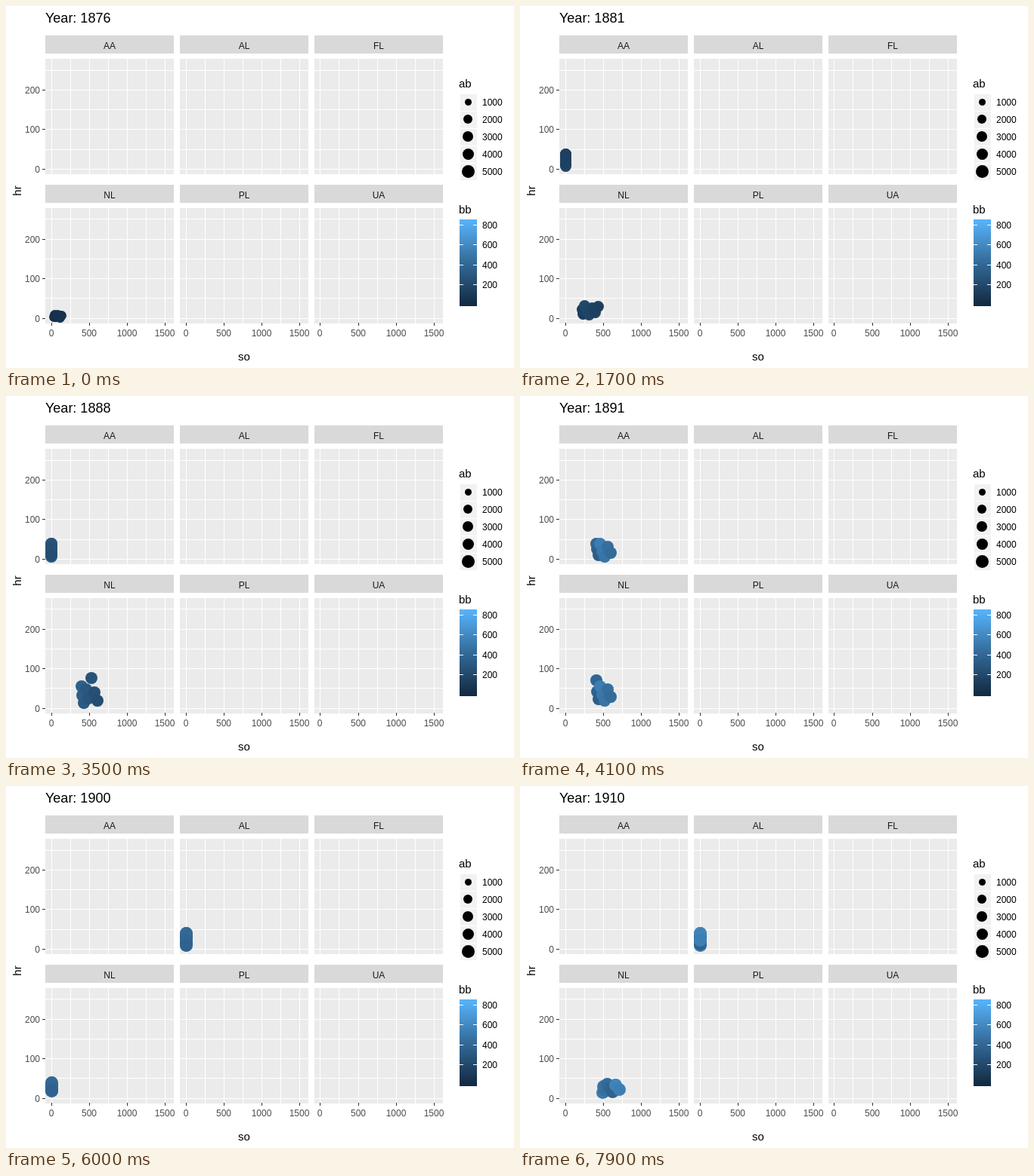
An HTML page with a canvas that plays this animation: 672 px wide and 480 px high, repeating every 8 s.

```html
<!DOCTYPE html>
<html lang="en">
<head>
<meta charset="utf-8">
<title>Seasons by league</title>
<style>
html, body { margin: 0; width: 100%; height: 100%; overflow: hidden; background: #fff; }
canvas { display: block; width: 672px; height: 480px; }
</style>
</head>
<body>
<canvas id="stage" width="672" height="480"></canvas>
<script>
const ctx = document.getElementById('stage').getContext('2d');
const LOOP = 8000, FIRST_YEAR = 1876;
const PANEL_W = 170, PANEL_H = 153;
const PANELS = ['AA', 'AL', 'FL', 'NL', 'PL', 'UA'].map((name, i) => ({
  name,
  x: 52 + 178 * (i % 3),
  y: i < 3 ? 70 : 268,
  zeroX: 59.7 + 177.825 * (i % 3),
  zeroY: i < 3 ? 215.9 : 413.6
}));
const RAMP = [[19, 43, 67], [51, 106, 152], [86, 177, 247]];
const MAX_BB = 835;

const soX = (panel, so) => panel.zeroX + so * 0.1004;
const hrY = (panel, hr) => panel.zeroY - hr * 0.525;

// Returns a function of the year, linear between [year, value] anchors.
const curve = (...anchors) => year => {
  let a = anchors[0];
  for (const b of anchors) {
    if (year <= b[0]) return b === a ? a[1] : a[1] + (b[1] - a[1]) * (year - a[0]) / (b[0] - a[0]);
    a = b;
  }
  return a[1];
};
const atBats = curve([1876, 2500], [1879, 2850], [1884, 3950], [1888, 4700], [1910, 5100]);
const walks = curve([1876, 42], [1879, 65], [1884, 210], [1888, 290], [1889, 440], [1895, 425],
  [1901, 335], [1910, 465]);
const soLow = curve([1876, 35], [1879, 172], [1882, 225], [1884, 458], [1888, 396], [1892, 405],
  [1895, 236], [1910, 489]);
const soSpan = curve([1876, 100], [1884, 240], [1895, 160], [1910, 217]);
const hrLow = curve([1876, 2], [1888, 14], [1895, 25], [1901, 18], [1908, 8], [1910, 15]);
const hrHigh = curve([1876, 8], [1884, 39], [1888, 56], [1895, 55], [1901, 38], [1908, 20], [1910, 33]);
const hrBest = curve([1876, 9], [1883, 34], [1884, 142], [1885, 54], [1888, 77], [1895, 61],
  [1901, 39], [1908, 22], [1910, 35]);

const LEAGUES = {
  NL: { from: 1876, to: 1910, counted: y => y < 1897 || y > 1909 },
  AA: { from: 1882, to: 1891, hr: [7, 38], counted: y => y > 1888 },
  UA: { from: 1884, to: 1884, hr: [5, 32] },
  PL: { from: 1890, to: 1890, hr: [20, 66], so: [321, 100], counted: () => true },
  AL: { from: 1901, to: 1910, hr: [9, 40] }
};

// Spreads the teams of a season over its ranges, in an order shuffled by the year.
function season(name, year) {
  const league = LEAGUES[name];
  if (!league || year < league.from || year > league.to) return [];
  const n = name === 'NL' && year > 1891 && year < 1900 ? 12 : 8;
  const [low, high] = league.hr || [hrLow(year), hrHigh(year)];
  const best = league.hr ? high : hrBest(year);
  const [least, span] = league.so || [soLow(year), soSpan(year)];
  const counted = league.counted && league.counted(year);
  return Array.from({ length: n }, (_, i) => {
    const power = (i * 5 + year * 3 + 6) % n;
    const patience = (i * 7 + year + 7) % n / (n - 1);
    return {
      so: counted ? least + span * (i / (n - 1)) ** 1.5 : 0,
      hr: power === n - 1 ? best : low + (high - low) * (power / (n - 2)) ** 1.2,
      bb: walks(year) * (0.78 + 0.44 * patience)
    };
  });
}

function diameter(ab) {
  const size = 1 + 5 * Math.sqrt((ab - 211) / 5570);
  return Math.floor(size * 2.845 + 1.24);
}
function shade(bb) {
  const t = Math.min(1, bb / MAX_BB) * 2;
  const k = t < 1 ? 0 : 1;
  return `rgb(${RAMP[k].map((c, i) => Math.round(c + (RAMP[k + 1][i] - c) * (t - k)))})`;
}

function rect(x, y, w, h, color) {
  ctx.fillStyle = color;
  ctx.fillRect(x, y, w, h);
}
// Dots sit on whole pixels.
function dot(x, y, ab, color) {
  const d = diameter(ab), r = d / 2;
  const snap = v => Math.ceil(v - r - 0.5) + r;
  ctx.fillStyle = color;
  ctx.beginPath();
  ctx.arc(snap(x), snap(y), r, 0, 2 * Math.PI);
  ctx.fill();
}
function text(s, x, y, size, color = '#000', align = 'left') {
  ctx.font = `${size}px "Liberation Sans", Arial, sans-serif`;
  ctx.fillStyle = color;
  ctx.textAlign = align;
  ctx.fillText(s, x, y);
}

function drawPanel(panel, index, year) {
  const { x, y, name } = panel;
  const column = so => Math.round(soX(panel, so));
  const row = hr => Math.round(hrY(panel, hr));
  rect(x, y - 31, PANEL_W, 24, '#d9d9d9');
  text(name, x + 85, y - 13, 12, '#1a1a1a', 'center');
  rect(x, y, PANEL_W, PANEL_H, '#ebebeb');
  for (let so = 0; so <= 1500; so += 250) rect(column(so), y, 1, PANEL_H, '#fff');
  for (let hr = 0; hr <= 250; hr += 50) rect(x, row(hr), PANEL_W, 1, '#fff');

  ctx.save();
  ctx.beginPath();
  ctx.rect(x, y, PANEL_W, PANEL_H);
  ctx.clip();
  for (const team of season(name, year)) {
    dot(soX(panel, team.so) + 0.5, hrY(panel, team.hr) + 0.5, atBats(year), shade(team.bb));
  }
  ctx.restore();

  if (index % 3 === 0) {
    for (let hr = 0; hr <= 200; hr += 100) {
      rect(x - 4, row(hr), 4, 1, '#333');
      text(hr, x - 7, row(hr) + 5, 12, '#4d4d4d', 'right');
    }
  }
  if (index > 2) {
    for (let so = 0; so <= 1500; so += 500) {
      rect(column(so), 420, 1, 4, '#333');
      text(so, column(so), 438, 12, '#4d4d4d', 'center');
    }
  }
}

function drawLegends() {
  text('ab', 599, 108, 15);
  for (let i = 0; i < 5; i++) {
    const ab = 1000 * (i + 1), y = 116 + 23 * i;
    rect(601, y + 1, 22, 22, '#f2f2f2');
    dot(611.5, y + 11.5, ab, '#000');
    text(ab, 630, y + 16, 12);
  }
  text('bb', 599, 275, 15);
  const bar = ctx.createLinearGradient(0, 395, 0, 286);
  RAMP.forEach((_, i) => bar.addColorStop(i / 2, shade(MAX_BB * i / 2)));
  rect(600, 283, 23, 115, bar);
  for (let bb = 200; bb <= 800; bb += 200) {
    const y = Math.floor(395.46 - bb * 0.1309);
    rect(600, y, 5, 1, '#fff');
    rect(618, y, 5, 1, '#fff');
    text(bb, 630, y + 5, 12);
  }
}

function draw(now) {
  const tick = Math.floor(now % LOOP / 100);
  // Two steps per year; every third tick rests until the pace picks up.
  const step = tick < 32 ? Math.floor(2 * tick / 3) : tick - 11;
  const titleYear = FIRST_YEAR + Math.floor(step / 2);
  const dataYear = FIRST_YEAR + Math.ceil(step / 2);
  rect(0, 0, 672, 480, '#fff');
  text('Year: ' + titleYear, 52, 22, 18);
  PANELS.forEach((panel, i) => drawPanel(panel, i, dataYear));
  text('so', 315, 470, 15, '#000', 'center');
  ctx.save();
  ctx.translate(20, 245);
  ctx.rotate(-Math.PI / 2);
  text('hr', 0, 0, 15, '#000', 'center');
  ctx.restore();
  drawLegends();
}

const start = performance.now();
function frame() {
  draw(performance.now() - start);
  requestAnimationFrame(frame);
}
frame();
</script>
</body>
</html>
```
